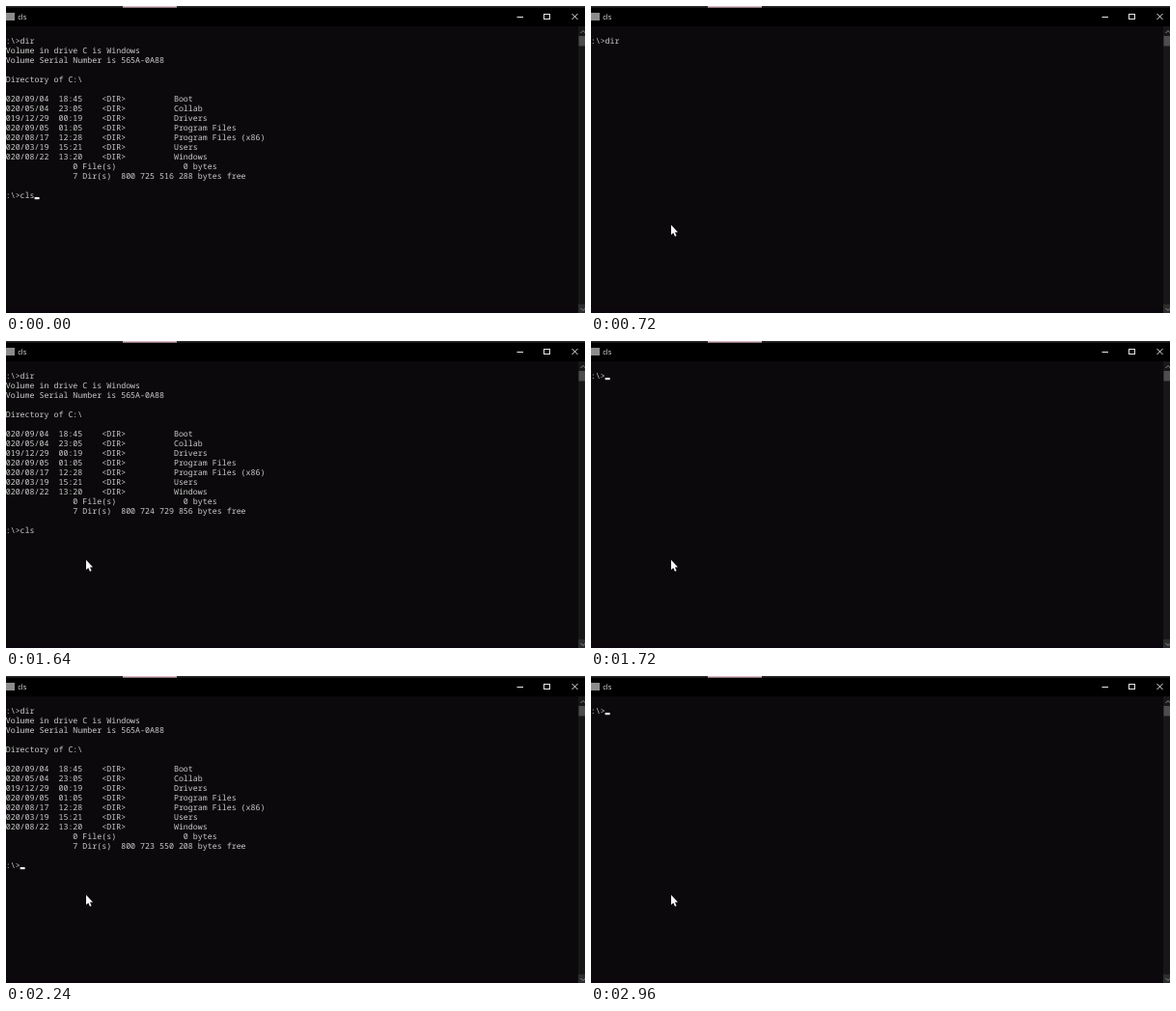
These frames come from a looping animation (600x318 px, 3640 ms). An HTML page with a canvas:

```html
<!DOCTYPE html>
<html lang="en">
<head>
<meta charset="utf-8">
<title>cls</title>
<style>
  html, body { margin: 0; width: 100%; height: 100%; overflow: hidden; background: #0b090b; }
  canvas { display: block; width: 600px; height: 318px; }
</style>
</head>
<body>
<canvas id="stage"></canvas>
<script>
const W = 600, H = 318, LOOP = 3640;
const CELL = 4.986, LEFT = -5.3, ROW = 10, BASE = 38.6;
const MONO = '8.31px "Noto Sans Mono", "DejaVu Sans Mono", monospace';
const TITLE = '7.5px "Open Sans", "Noto Sans", sans-serif';

const canvas = document.getElementById('stage');
const ctx = canvas.getContext('2d');
const scale = window.devicePixelRatio || 1;
canvas.width = W * scale;
canvas.height = H * scale;

const folders = [
  ['2020/09/04  18:45', 'Boot'],
  ['2020/05/04  23:05', 'Collab'],
  ['2019/12/29  00:19', 'Drivers'],
  ['2020/09/05  01:05', 'Program Files'],
  ['2020/08/17  12:28', 'Program Files (x86)'],
  ['2020/03/19  15:21', 'Users'],
  ['2020/08/22  13:20', 'Windows']
];

const listing = free => [
  'C:\\>dir',
  ' Volume in drive C is Windows',
  ' Volume Serial Number is 565A-0A88',
  '',
  ' Directory of C:\\',
  '',
  ...folders.map(([date, name]) => date + '    <DIR>          ' + name),
  '0 File(s)'.padStart(24) + '0 bytes'.padStart(21),
  '7 Dir(s)'.padStart(23) + '  ' + free + ' bytes free',
  ''
];

const lists = ['800 725 516 288', '800 724 729 856', '800 723 550 208'].map(listing);

// [start ms, lines above the prompt (null = blank screen), typed text, cursor shown]
const EMPTY = [];
const steps = [
  [0, lists[0], 'cls', true],
  [160, lists[0], 'cls', false],
  [240, null],
  [280, EMPTY, '', true],
  [520, EMPTY, 'd', true],
  [600, EMPTY, 'di', true],
  [640, EMPTY, 'dir', true],
  [720, EMPTY, 'dir', false],
  [800, lists[1], '', true],
  [1240, lists[1], 'c', true],
  [1360, lists[1], 'cl', true],
  [1480, lists[1], 'cls', true],
  [1600, lists[1], 'cls', false],
  [1680, null],
  [1720, EMPTY, '', true],
  [1960, EMPTY, 'd', true],
  [2040, EMPTY, 'dir', true],
  [2160, EMPTY, 'dir', false],
  [2240, lists[2], '', true],
  [2520, lists[2], 'c', true],
  [2640, lists[2], 'cl', true],
  [2720, lists[2], 'cls', true],
  [2840, lists[2], 'cls', false],
  [2920, null],
  [2960, EMPTY, '', true]
];
const POINTER_FROM = 160;

function rect(x, y, w, h, color) {
  ctx.fillStyle = color;
  ctx.fillRect(x, y, w, h);
}

function line(points, color, width = 1) {
  ctx.beginPath();
  points.forEach(([x, y]) => ctx.lineTo(x, y));
  ctx.strokeStyle = color;
  ctx.lineWidth = width;
  ctx.stroke();
}

function drawWindow() {
  rect(0, 0, W, H, '#0b090b');
  rect(0, 314, 593, 4, '#0b060e');
  rect(0, 0, W, 21, '#000');
  rect(0, 0, W, 1.6, '#2b2a2b');
  rect(121, 0, 56, 1.6, '#dbb9c3');

  rect(0, 7, 9, 8, '#8c8c8c');
  ctx.font = TITLE;
  ctx.fillStyle = '#e6e6e6';
  ctx.fillText('cls', 12.3, 13.7);

  line([[529.5, 11.5], [536, 11.5]], '#e8e8e8');
  ctx.strokeStyle = '#e8e8e8';
  ctx.strokeRect(557.5, 8.5, 6, 5);
  line([[586.5, 8], [592.5, 14]], '#e8e8e8');
  line([[592.5, 8], [586.5, 14]], '#e8e8e8');

  rect(593, 21, 7, H - 21, '#171717');
  rect(593.5, 31, 6.5, 10.5, '#4d4d4d');
  rect(593, 309, 7, 9, '#2c2c2c');
  line([[595.5, 28], [598, 25.5], [600.5, 28]], '#8a8a8a');
  line([[595.5, 313], [598, 315.5], [600.5, 313]], '#8a8a8a');
}

function drawConsole([, above, typed, cursor]) {
  if (!above) return;
  const rows = [...above, 'C:\\>' + typed];
  ctx.font = MONO;
  ctx.fillStyle = '#cccccc';
  rows.forEach((text, i) => ctx.fillText(text, LEFT, BASE + i * ROW));
  if (cursor) {
    const x = LEFT + (4 + typed.length) * CELL;
    rect(x, BASE + (rows.length - 1) * ROW - 0.6, CELL, 2.2, '#f2f2f2');
  }
}

function drawPointer() {
  ctx.beginPath();
  [[83, 226.8], [83, 237], [85.3, 235], [87, 238.8], [88.6, 238.1], [87, 234.4], [90, 234.2]]
    .forEach(([x, y]) => ctx.lineTo(x, y));
  ctx.closePath();
  ctx.fillStyle = '#f4f4f4';
  ctx.fill();
}

function draw(now) {
  const t = now % LOOP;
  ctx.setTransform(scale, 0, 0, scale, 0, 0);
  ctx.textRendering = 'geometricPrecision';
  drawWindow();
  drawConsole(steps.filter(s => s[0] <= t).pop());
  if (t >= POINTER_FROM) drawPointer();
}

let start;
function tick(now) {
  start ??= now;
  draw(Math.max(0, now - start));
  requestAnimationFrame(tick);
}
draw(0);
requestAnimationFrame(tick);
</script>
</body>
</html>
```
